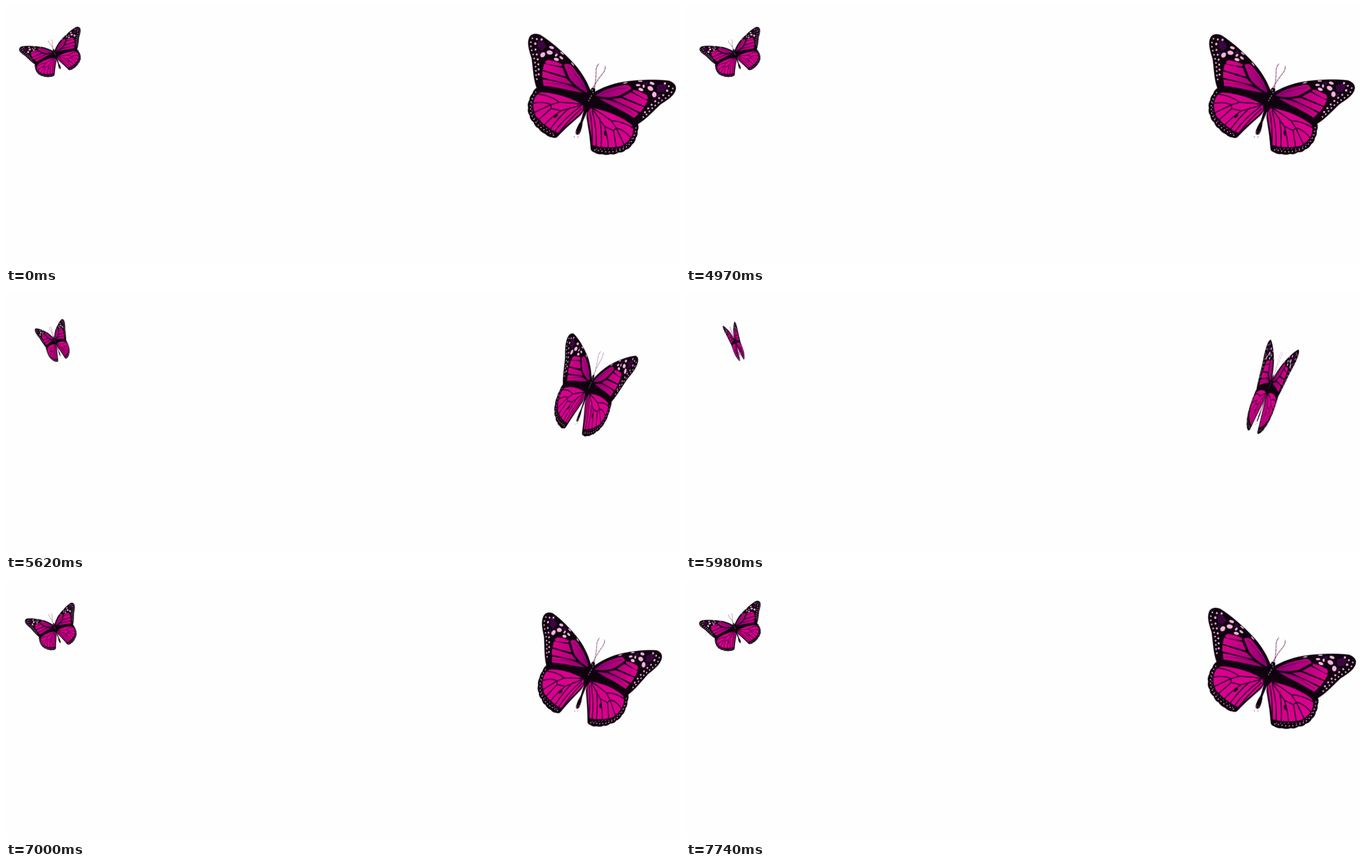
Write an HTML page that moves like this. It is 1206x465 px and loops after 7.89 s.

```html
<!DOCTYPE html>
<html lang="en">
<head>
<meta charset="utf-8">
<title>Butterflies</title>
<style>
  html, body { margin: 0; width: 100%; height: 100%; overflow: hidden; background: #fefefe; }
  svg { display: block; width: 100%; height: 100%; }
  path { stroke-linecap: round; stroke-linejoin: round; }
  .ink { fill: #10030f; }
  .line { fill: none; stroke: #2c0029; }
  .dots { fill: none; stroke: #f3b3dc; }
  .pale { fill: #f6b4dd; }
  .flap { animation: flap 7890ms step-end infinite; }

  /* Wings fold towards the body axis, held in short steps. */
  @keyframes flap {
    0% { transform: scaleX(1); }
    62.98% { transform: scaleX(.985); }
    64.88% { transform: scaleX(.947); }
    66.79% { transform: scaleX(.858); }
    68.94% { transform: scaleX(.702); }
    71.22% { transform: scaleX(.48); }
    73.89% { transform: scaleX(.282); }
    75.79% { transform: scaleX(.212); }
    77.56% { transform: scaleX(.185); }
    81.24% { transform: scaleX(.228); }
    83.14% { transform: scaleX(.347); }
    84.91% { transform: scaleX(.5); }
    86.81% { transform: scaleX(.668); }
    88.71% { transform: scaleX(.808); }
    90.62% { transform: scaleX(.923); }
    92.39% { transform: scaleX(.977); }
    94.29% { transform: scaleX(.992); }
    96.19%, 100% { transform: scaleX(1); }
  }
</style>
</head>
<body>
<svg viewBox="0 0 1206 465" preserveAspectRatio="none">
  <defs>
    <linearGradient id="fore" gradientUnits="userSpaceOnUse" x1="1056" y1="158" x2="1142" y2="176">
      <stop offset="0" stop-color="#8c0070"/>
      <stop offset=".5" stop-color="#b4007f"/>
      <stop offset="1" stop-color="#d8008d"/>
    </linearGradient>

    <!-- One half, drawn where the right wing lies, turned upright about the body -->
    <g id="half" transform="rotate(-19.7) translate(-1046 -163)">
      <path fill="#dfa6cb" d="M1040 183L1046 240L1041 217L1036 191Z"/>
      <path class="ink" d="M1046 163L1050 156C1065 147 1085 139 1105 136C1135 132 1165 131 1186 134
        C1196 137 1201 144 1198 152C1194 163 1181 170 1171 177C1158 189 1146 203 1131 212
        Q1133 219 1130 225Q1131 232 1127 237Q1126 245 1120 249Q1116 257 1109 258Q1104 264 1096 263
        Q1089 268 1082 266Q1074 269 1067 266Q1058 267 1053 263Q1046 261 1046 255
        C1045 238 1042 219 1039 200L1040 183Z"/>

      <path fill="#3b0640" d="M1164 144Q1176 137 1183 143L1177 154L1166 155ZM1140 138L1149 136L1146 144ZM1163 161L1172 157L1166 165Z"/>
      <g fill="url(#fore)">
        <path d="M1055 161C1066 151 1084 146 1104 142C1112 140 1118 143 1119 149L1097 161C1082 165 1066 164 1055 161Z"/>
        <path d="M1122 150L1133 153L1147 160L1149 166L1145 168L1121 154Z"/>
        <path d="M1118 155L1148 170L1143 180L1103 163Z"/>
        <path d="M1100 165L1142 182L1135 191L1084 167Z"/>
        <path d="M1061 166L1082 169C1100 175 1118 185 1132 193L1124 201C1105 188 1082 179 1061 166Z"/>
      </g>
      <path class="line" stroke-width="1" opacity=".5" d="M1064 158Q1086 149 1112 147M1069 166Q1098 174 1125 196"/>

      <path fill="#d9008e" d="M1047 183C1066 185 1096 196 1114 209C1122 213 1124 220 1121 230
        C1118 240 1108 248 1099 252L1082 254L1062 253L1050 250C1048 231 1042 211 1041 191Z"/>
      <path class="line" stroke-width="2" d="M1047 182Q1066 193 1083 206L1092 219L1087 224L1071 216L1047 182
        M1083 206Q1103 207 1122 219M1092 219Q1106 222 1118 237M1092 219L1106 249M1087 224L1092 254
        M1071 216Q1077 236 1078 254M1062 201Q1067 226 1065 254M1049 188Q1058 222 1056 252M1045 190Q1050 220 1049 248"/>
      <ellipse class="ink" cx="1072.500" cy="229" rx="2.500" ry="4.500" transform="rotate(-12 1072 229)"/>
      <path fill="none" stroke="#10030f" stroke-width="8" d="M1047 169C1067 175 1096 192 1122 207"/>

      <g class="pale">
        <ellipse cx="1160" cy="159" rx="4" ry="5"/>
        <ellipse cx="1153" cy="148" rx="5.500" ry="3.800" transform="rotate(30 1153 148)"/>
        <ellipse cx="1156" cy="139" rx="4.500" ry="2.500" transform="rotate(20 1156 139)"/>
        <ellipse cx="1136" cy="150" rx="4.500" ry="2.600" transform="rotate(25 1136 150)"/>
        <ellipse cx="1131" cy="142" rx="4" ry="2"/>
        <ellipse cx="1141" cy="144" rx="2" ry="3"/>
        <ellipse cx="1135" cy="135" rx="4" ry="1.300"/>
        <ellipse cx="1108" cy="138" rx="4" ry="1" transform="rotate(-10 1108 138)"/>
        <circle cx="1179" cy="139" r="2"/>
        <circle cx="1186" cy="144" r="1.800"/>
        <circle cx="1183" cy="152" r="2.200"/>
      </g>
      <path class="dots" stroke-width="3" stroke-dasharray="0 7.500" d="M1193 148Q1192 159 1176 168Q1160 178 1147 194L1136 203"/>
      <path class="dots" stroke-width="3.600" stroke-dasharray="0 9" d="M1176 160Q1160 171 1148 185L1139 196"/>
      <path class="dots" stroke-width="2.200" stroke-dasharray="0 6.500" d="M1127 219Q1126 240 1110 253Q1095 263 1074 262L1051 258"/>
      <path class="dots" stroke-width="1.500" stroke-dasharray="0 7" d="M1123 232Q1115 250 1097 257L1055 257"/>

      <path fill="none" stroke="#7d3968" stroke-width="1.200" stroke-dasharray="5 1.500" d="M1050 147L1060 131L1070 118Q1073 112 1072 108"/>
    </g>

    <g id="butterfly">
      <use href="#half"/>
      <use href="#half" transform="scale(-1 1)"/>
      <path class="ink" d="M0 -17Q5 -17 4 -10Q8 -1 6 9Q5 17 3 25L2 48Q5 58 4 69L0 73L-4 69Q-5 58 -2 48L-3 25Q-5 17 -6 9Q-8 -1 -4 -10Q-5 -17 0 -17Z"/>
      <path fill="none" stroke="#d9c3d3" stroke-width="1.200" stroke-dasharray="2 3" d="M-2 -13L2 -8M1 -3L-1 8"/>
      <path fill="none" stroke="#96477c" stroke-width="1" d="M-2 66L-3 72M2 65L3 71M-4 77L-2 78M2 76L4 75"/>
    </g>
  </defs>

  <g transform="translate(1046 163) rotate(19.7)">
    <g class="flap"><use href="#butterfly"/></g>
  </g>
  <g transform="translate(87 84.4) scale(-.416 .416) rotate(19.7)">
    <g class="flap"><use href="#butterfly"/></g>
  </g>
</svg>
</body>
</html>
```
